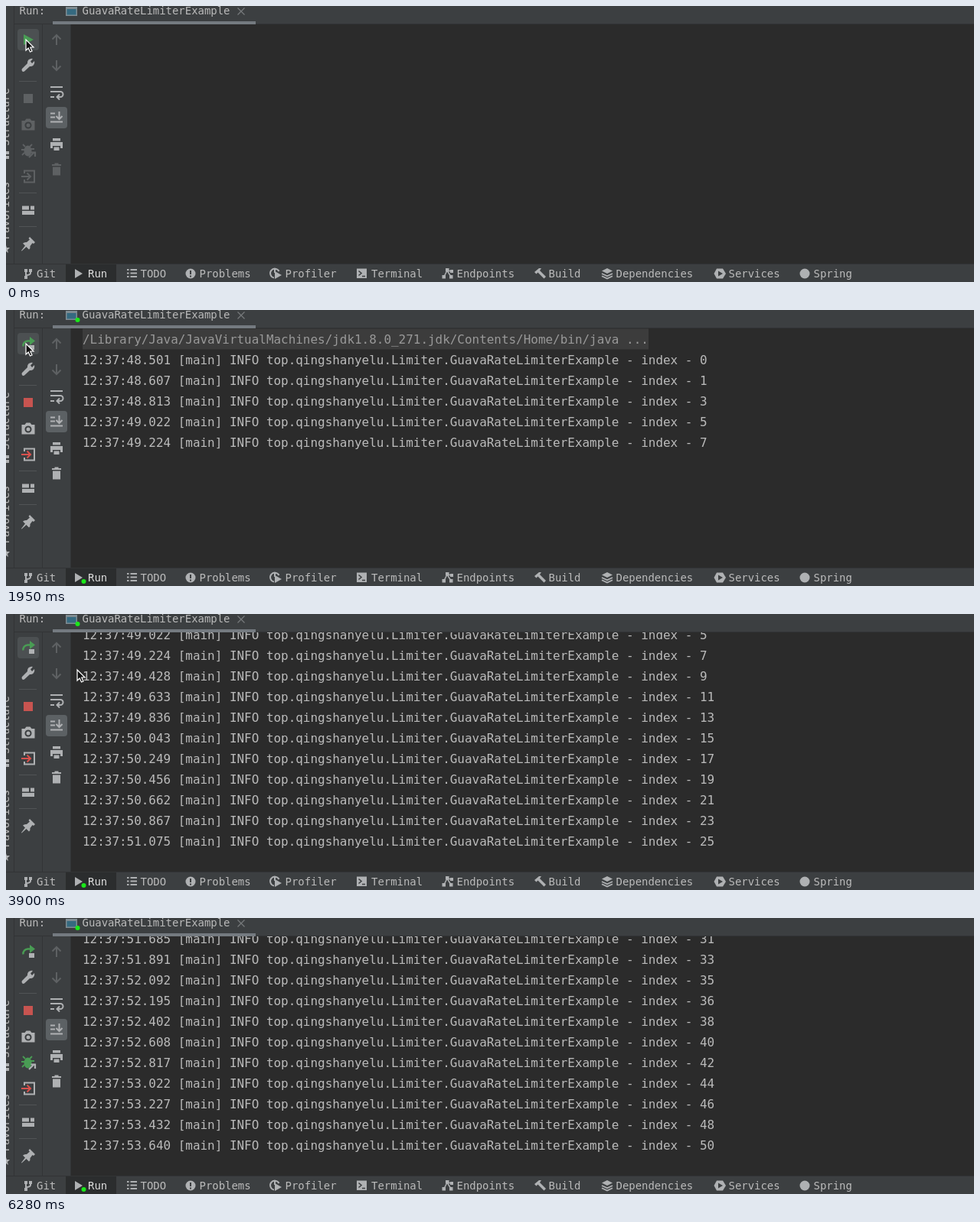
An HTML page that plays this animation: 1264 px wide and 361 px high, repeating every 6.41 s.

```html
<!DOCTYPE html>
<html lang="en">
<head>
<meta charset="utf-8">
<title>Run console</title>
<style>
html, body { margin: 0; width: 100%; height: 100%; overflow: hidden; background: #3c3f41; }
svg { display: block; width: 1264px; height: 361px; }
text { font: 13.95px "DejaVu Sans Mono", monospace; fill: #bbb; white-space: pre; }
#log text { font-size: 15.947px; }
#log .cmd { fill: #999; }
.i { fill: #afb1b3; }
.l { fill: none; stroke: #afb1b3; stroke-width: 2; }
.dim { fill: #5e6163; }
.dim.l { fill: none; stroke: #5e6163; }
.idle { --c: #5e6163; }
.run .idle { --c: #afb1b3; }
.idle .i { fill: var(--c); }
.idle .l { stroke: var(--c); }
.line { stroke: #515456; }
.green { fill: #499c54; }
.dot { fill: #1ae81a; }
.stop { fill: #5e6163; }
.run .stop { fill: #c75450; }
.exit { stroke: #5e6163; }
.run .exit { stroke: #d9514d; }
.on, .run .off { display: none; }
.run .on { display: inline; }
.bug { --b: #5e6163; --a: #5e6163; }
.run .bug { display: none; }
.run.debug .bug { display: inline; --b: #499c54; --a: #afb1b3; }
.run #lower { transform: translateY(-34px); }
.run.debug #lower { transform: none; }
</style>
</head>
<body>
<svg id="stage" viewBox="0 0 1264 361">
  <defs>
    <clipPath id="view"><rect x="85" y="24" width="1179" height="313"/></clipPath>
  </defs>
  <rect width="1264" height="361" fill="#3c3f41"/>
  <rect x="85" y="24" width="1179" height="313" fill="#2b2b2b"/>
  <path d="M10.5 0V337M47.5 24V337M84.5 24V337M11 23.5H1264M0 337.5H1264" stroke="#323436"/>

  <!-- header -->
  <text x="17.5" y="11">Run:</text>
  <rect x="61" y="20" width="265" height="4" fill="#747a80"/>
  <path d="M78 1H93V13H78Z" fill="#7f8b91"/>
  <path d="M79.5 4H91.5V11.5H79.5Z" fill="#356a80"/>
  <circle class="dot on" cx="93.500" cy="13" r="3"/>
  <text x="99.500" y="11">GuavaRateLimiterExample</text>
  <path d="M302.500 2.500L311.500 11.500M311.500 2.500L302.500 11.500" stroke="#777a7c" stroke-width="1.200"/>

  <!-- left stripe -->
  <text transform="translate(3.500 183) rotate(-90)">Structure</text>
  <text transform="translate(3.500 305.500) rotate(-90)">Favorites</text>
  <path class="i" d="M0 190H4V194H0ZM0 196H4V200H0ZM0 313L1 316H5L2 319L3 323L0 321Z"/>

  <!-- first tool column -->
  <rect id="hover" x="15" y="30" width="28" height="28" rx="4" fill="#4c5052"/>
  <path class="green off" d="M23 37L36 44L23 51Z"/>
  <g class="on">
    <path d="M22.500 47.500A6 6 0 0 1 28.500 40.500H32" fill="none" stroke="#499c54" stroke-width="2.400"/>
    <path class="green" d="M31 35L38 40.500L31 46Z"/>
    <rect class="i" x="30" y="46" width="7" height="6"/>
  </g>
  <path class="i" d="M21 82L28 75A5.500 5.500 0 0 1 35 69L32 72.500L34 75L37 72A5.500 5.500 0 0 1 31 79L24 85.500Q22 86.500 21 85Q20 83.500 21 82Z"/>
  <path class="line" d="M17 98.500H40"/>
  <rect class="stop" x="23" y="115" width="12" height="12"/>
  <g class="idle">
    <path class="i" fill-rule="evenodd" d="M20.500 150H24.500L26.500 147.500H31.500L33.500 150H37.500V162.500H20.500ZM29 151.500A4.500 4.500 0 1 0 29.010 151.500Z"/>
    <circle class="i" cx="29" cy="156" r="2.500"/>
  </g>
  <g class="bug">
    <path d="M25 184L22 181M31 184L34 181M24 188H20M32 187H37M24 192L21 195" stroke="var(--b)" stroke-width="1.800"/>
    <ellipse cx="28.500" cy="189.500" rx="5" ry="7" fill="var(--b)"/>
    <path d="M30 198L37 191M32.500 191.500H38V197" fill="none" stroke="var(--a)" stroke-width="2.200"/>
  </g>
  <g id="lower">
    <g class="idle"><path class="l" d="M24 219V215.500H37V230.500H24V227"/></g>
    <path class="exit" d="M20 223H31M27.500 218.500L32 223L27.500 227.500" fill="none" stroke-width="2"/>
    <path class="line" d="M17 244.500H40M17 288.500H40"/>
    <path class="i" d="M21 261.500H30V266.500H21ZM32 261.500H37V266.500H32ZM21 268H37V273H21Z"/>
    <path class="i" d="M31 302L38 309L36 311L34.500 310L31.500 314Q32 317 30 318.500L26.500 315L20.500 320.500L20 320L25 313.500L22 310.500Q24 308.500 27 309L31 305.500L29.500 304Z"/>
  </g>

  <!-- second tool column -->
  <path class="l dim" d="M66 51V38M60.500 43.500L66 38L71.500 43.500M66 71V84M60.500 78.500L66 84L71.500 78.500"/>
  <path class="l" d="M58 106H74M58 112H71A3.500 3.500 0 0 1 71 119H67M58 119H63M70 115.500L66.500 119L70 122.500"/>
  <rect x="52" y="132" width="28" height="28" rx="4" fill="#5c6164"/>
  <path class="l" d="M58 140.500H64M58 145.500H64M58 151.500H74M69.500 138V148M65.500 144L69.500 148L73.500 144"/>
  <path class="i" d="M61 173H71V176.500H61ZM58 178H74V186H71V183H61V186H58ZM62.500 184.500H69.500V189H62.500Z"/>
  <g class="idle"><path class="i" d="M60 207H63.500V205.500H68.500V207H72V209H60ZM61 210.500H71V221.500H61Z"/></g>

  <!-- console -->
  <g clip-path="url(#view)">
    <g id="log">
      <g id="command">
        <rect x="100" y="24.500" width="739" height="27" fill="#3c3c3c"/>
        <text class="cmd" x="100" y="44">/Library/Java/JavaVirtualMachines/jdk1.8.0_271.jdk/Contents/Home/bin/java ...</text>
      </g>
    </g>
  </g>

  <!-- bottom bar -->
  <rect x="78" y="338" width="66" height="23" fill="#2b2d2e"/>
  <g id="tabs"></g>
  <g transform="translate(0 350)">
    <path class="l" stroke-width="1.600" d="M26 -4V5M32 -3V-1Q32 2 26 2"/>
    <path class="i" d="M24 -6H28V-2H24ZM24 3H28V7H24ZM30 -6H34V-2H30Z"/>
    <path class="i" d="M90 -6L100 0L90 6Z"/>
    <path class="l" d="M158 -5H160.500M162.500 -5H171M158 -0.500H160.500M162.500 -0.500H171M158 4H160.500M162.500 4H171"/>
    <circle class="i" cx="241" r="6.500"/>
    <path d="M241 -4V1M241 2.500V4.500" stroke="#3c3f41" stroke-width="2"/>
    <path class="l" d="M356.500 -3A6 6 0 1 0 350 5.500M351 -6V-1"/>
    <path class="i" d="M351 -3L360 2L351 7Z"/>
    <path class="i" d="M458 -6.500H471V6H458Z"/>
    <path d="M460.500 -3.500L464 -0.500L460.500 2.500M465 3.500H469" fill="none" stroke="#3c3f41" stroke-width="1.600"/>
    <path class="l" d="M572 4L576 -4L581 4M576 -4L582 -3" style="stroke-width:1.500"/>
    <path class="i" d="M569.500 2H574V6.500H569.500ZM574 -7H578.500V-2.500H574ZM579 2H583.500V6.500H579ZM580 -5H584V-1H580Z"/>
    <path class="i" d="M690 -2L696 -7H699L697 -4L705 4L702.500 6.500L694.500 -1.500L692.500 0.500Z"/>
    <path class="i" d="M785 -7L792 -3.500L785 0L778 -3.500Z"/>
    <path class="l" style="stroke-width:1.800" d="M778 0L785 3.200L792 0M778 3.200L785 6.500L792 3.200"/>
    <path class="i" d="M928 -6.500H936L940 0L936 6.500H928L924.500 0Z"/>
    <path d="M930 -3.500L936 0L930 3.500Z" fill="#3c3f41"/>
    <circle class="i" cx="1043" r="6.500"/>
    <circle class="dot on" cx="101.500" cy="5" r="3"/>
  </g>

  <path id="cursor" d="M0 0V14L3.200 11L5.500 16L8 15L5.800 10H10Z" fill="#111" stroke="#fff" stroke-width="1.200"/>
</svg>
<script>
const LOOP = 6410, ROW = 27, VIEW = 313;
const START = 750, MOVE = 3900, LEAVE = 4050, DEBUG = 4500;

// Timestamps after 12:37, and the moment each line reaches the console.
const stamps = `48.501 48.607 48.813 49.022 49.224 49.428 49.633 49.836 50.043
  50.249 50.456 50.662 50.867 51.075 51.277 51.480 51.685 51.891 52.092 52.195
  52.402 52.608 52.817 53.022 53.227 53.432 53.640`.split(/\s+/);
const shownAt = [1200, 1200, 1500, 1650, 1950, 2100, 2250, 2550, 2700,
  3000, 3150, 3300, 3600, 3750, 4050, 4200, 4350, 4640, 4790, 5090,
  5090, 5240, 5540, 5690, 5840, 6130, 6280];

const tabs = { Git: 40, Run: 107, TODO: 175.5, Problems: 252.5, Profiler: 364.5, Terminal: 477,
  Endpoints: 588.5, Build: 708.5, Dependencies: 796.5, Services: 943.5, Spring: 1054.5 };

const $ = id => document.getElementById(id);
const stage = $("stage"), log = $("log"), command = $("command");
const hover = $("hover"), cursor = $("cursor");

function addText(parent, x, y, value) {
  const el = document.createElementNS("http://www.w3.org/2000/svg", "text");
  el.setAttribute("x", x);
  el.setAttribute("y", y);
  el.textContent = value;
  return parent.appendChild(el);
}

for (const [name, x] of Object.entries(tabs)) {
  addText($("tabs"), x, 355, name).style.fill = name === "Run" ? "#ddd" : "";
}

const indexOf = i => i === 0 ? 0 : 2 * i - (i < 19 ? 1 : 2);
const rows = stamps.map((s, i) => addText(log, 100, 44 + ROW * (i + 1),
  `12:37:${s} [main] INFO top.qingshanyelu.Limiter.GuavaRateLimiterExample - index - ${indexOf(i)}`));

const show = (el, yes) => { el.style.display = yes ? "" : "none"; };

function draw(t) {
  const count = shownAt.filter(at => at <= t).length;
  rows.forEach((row, i) => show(row, i < count));
  // The command line and a trailing blank line also take up rows.
  const scroll = Math.max(0, (count + 2) * ROW - VIEW);
  log.setAttribute("transform", `translate(0 ${-scroll})`);

  stage.classList.toggle("run", t >= START);
  stage.classList.toggle("debug", t >= DEBUG);
  show(command, t >= START);
  show(hover, t < LEAVE);
  show(cursor, t < LEAVE);
  cursor.setAttribute("transform", t < MOVE ? "translate(26 44)" : "translate(93 73)");
}

const origin = performance.now();
function tick() {
  draw((performance.now() - origin) % LOOP);
  requestAnimationFrame(tick);
}
tick();
</script>
</body>
</html>
```
